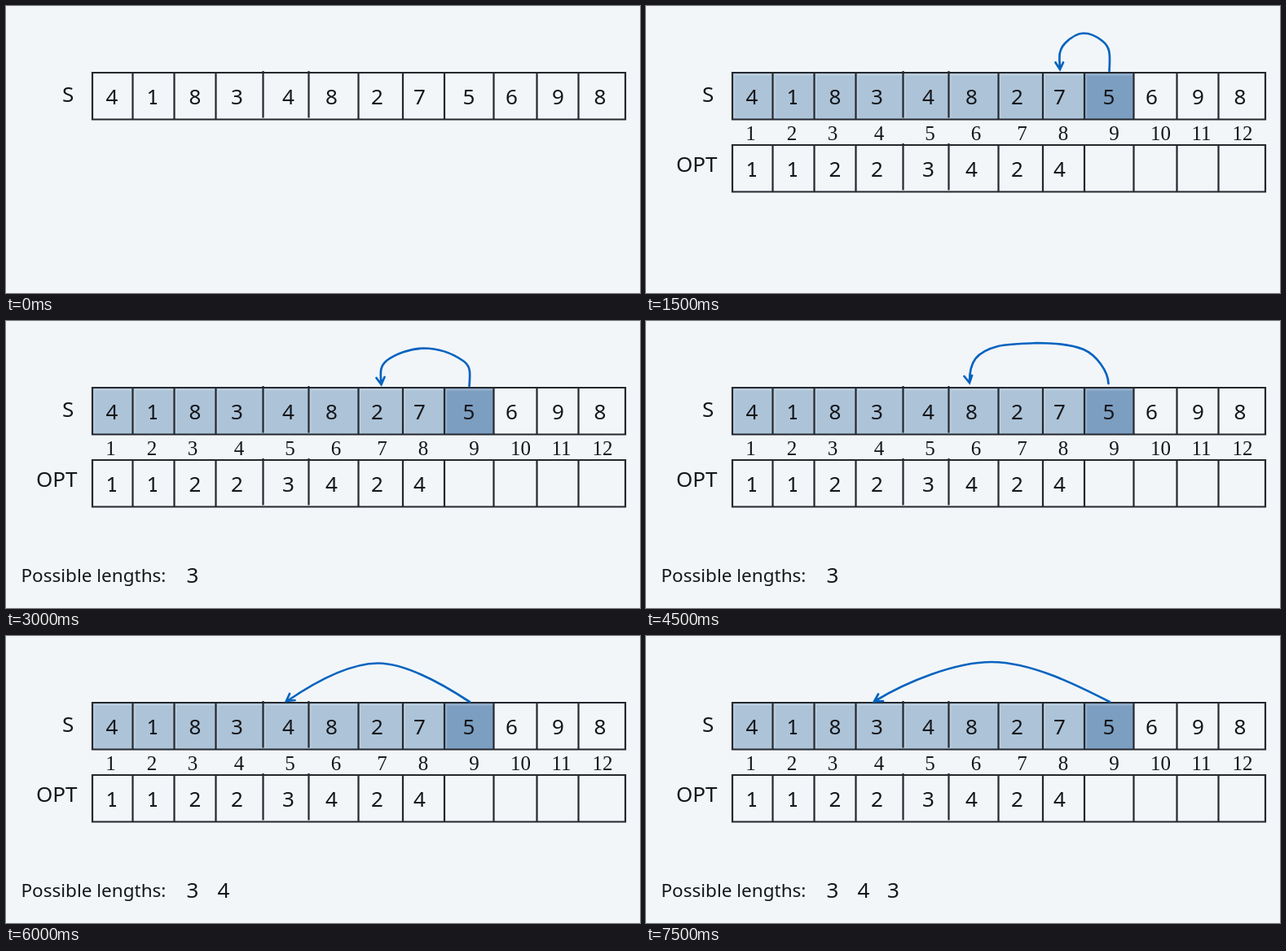
Animation, 778 px wide and 353 px high, one loop 8 s. Source, as an HTML page:

```html
<!DOCTYPE html>
<html lang="en">
<head>
<meta charset="utf-8">
<title>Longest increasing subsequence</title>
<style>
  html, body { margin: 0; width: 100%; height: 100%; overflow: hidden; background: #f2f6f9; }
  svg { display: block; width: 778px; height: 353px; }
  text { font: 26px "Noto Sans", "Open Sans", sans-serif; fill: #14171a; }
  .mid { text-anchor: middle; }
  .index { font: 25px "Liberation Serif", serif; }
  .label { font-size: 22.5px; }
  .lines { fill: none; stroke: #24282e; stroke-width: 2.2; }
  .foot { stroke: #14171a; stroke-width: 2; }
  .arrow { fill: none; stroke: #0563bf; stroke-width: 2.7; stroke-linecap: round; }
</style>
</head>
<body>
<svg id="stage" viewBox="0 0 778 353"></svg>
<script>
const STEP = 1500, LOOP = 8000;
const stage = document.getElementById('stage');
const edges = [106, 155.5, 206.5, 257.5, 315.5, 371.5, 432.5, 487, 538, 598.5, 651.5, 702.5, 760];
const centers = [130, 180, 232, 283.5, 346.5, 399.5, 455.5, 507.5, 568, 620.5, 677.5, 729];
const indexCenters = [128.5, 179, 229, 286, 348.5, 405, 461.5, 512, 574.5, 631.5, 681.5, 732];
const sequence = [4, 1, 8, 3, 4, 8, 2, 7, 5, 6, 9, 8];
const best = [1, 1, 2, 2, 3, 4, 2, 4];
const current = 8;

const arrows = [
  'M568.5 80C570 57 569 50 560 43C552 36.5 545 33.5 537 33.5C528 33.5 520 40 514 46C506 55 507 62 508 77M502.5 69.5L508 78L512 69.5',
  'M568.5 80C570 62 570 55 561 49C546 38.5 530 33.5 512 33.5C495 34 478 41 468 48C459 55 459 62 460.5 77M454.5 70L460.5 78L464.5 69',
  'M567.5 77C567 62 553 42 537 35C520 28 500 27 480 27C455 28 440 29 432 31C405 38 397 50 397 75M390.5 68L397 76L400 67',
  'M569 81C540 62 492 33 456 33.5C420 34 380 56 345 80M348 71L344 80L354.5 79',
  'M569 81C530 61 473 32 424 32C380 32 320 56 281 80M285 71.5L280 80.5L291 80'
];
const lengths = [
  { x: 229, value: 3, from: 2 },
  { x: 267, value: 4, from: 4 },
  { x: 303.5, value: 3, from: 5 }
];

const text = (x, y, value, cls = '') => `<text x="${x}" y="${y}" class="${cls}">${value}</text>`;

// Ones carry a short foot on the baseline.
const digit = (x, y, value) => text(x, y, value, 'mid') +
  (value === 1 ? `<path class="foot" d="M${x - 3} ${y - 1}h8"/>` : '');

function row(top, values) {
  const dividers = edges.slice(1, -1).map((x, i) =>
    `M${x} ${top - (i === 3 || i === 4 ? 2 : 0)}V${top + (i === 3 || i === 4 ? 55.5 : 57.5)}`).join('');
  return `<path class="lines" d="M106 ${top}H760V${top + 57.5}H106Z${dividers}"/>` +
    values.map((v, i) => digit(centers[i], top + 39, v)).join('');
}

function highlights() {
  return edges.slice(0, current + 1).map((x, i) => {
    const width = edges[i + 1] - x;
    const alpha = i === current ? 0.55 : 0.32;
    return `<rect x="${x}" y="82" width="${width}" height="57.5" fill="rgba(28,87,148,${alpha})"/>` +
      `<path d="M${x + 2} 138V84.5H${x + width - 1}" fill="none" stroke="#fff" stroke-opacity=".17" stroke-width="2.5"/>`;
  }).join('');
}

function scene(step) {
  let out = text(69, 118, 'S');
  if (step > 0) out += highlights();
  out += row(82, sequence);
  if (step === 0) return out;

  out += indexCenters.map((x, i) => text(x, 165, i + 1, 'index mid')).join('');
  out += text(37, 204, 'OPT') + row(171, best);
  out += `<path class="arrow" d="${arrows[step - 1]}"/>`;
  if (step > 1) out += text(18.5, 321, 'Possible lengths:', 'label');
  for (const { x, value, from } of lengths) if (step >= from) out += digit(x, 322, value);
  return out;
}

let shown = -1;
function draw() {
  const step = Math.floor((performance.now() % LOOP) / STEP);
  if (step !== shown) stage.innerHTML = scene(shown = step);
  requestAnimationFrame(draw);
}
draw();
</script>
</body>
</html>
```
